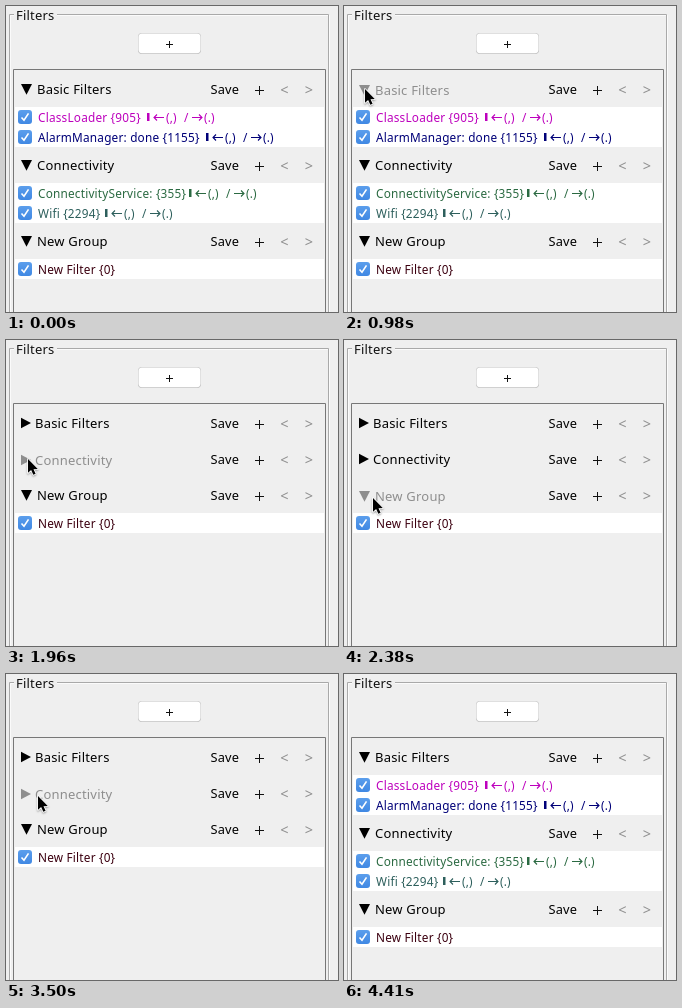
These frames come from a looping animation (332 by 306 pixels, 4.83 s). An HTML page with a canvas:

```html
<!DOCTYPE html>
<html lang="en">
<head>
<meta charset="utf-8">
<title>Filter groups</title>
<style>
  html, body { margin: 0; width: 100%; height: 100%; overflow: hidden; background: #efefef; }
  canvas { display: block; }
</style>
</head>
<body>
<canvas id="stage" width="332" height="306"></canvas>
<script>
const ctx = document.getElementById('stage').getContext('2d');
const LOOP = 4830, STEP = 70;
const FAMILY = '"Noto Sans", "Open Sans", sans-serif';
const GRAY = '#8e8e8e';

// "closed" is the time span in which a group is folded.
const groups = [
  { name: 'Basic Filters', closed: [1190, 4200], rows: [
    { text: 'ClassLoader {905}', color: '#bd00bd', tail: 142 },
    { text: 'AlarmManager: done {1155}', color: '#000078', tail: 201 }] },
  { name: 'Connectivity', closed: [1890, 3570], rows: [
    { text: 'ConnectivityService: {355}', color: '#2b6a42', tail: 184 },
    { text: 'Wifi {2294}', color: '#2d5f5c', tail: 100 }] },
  { name: 'New Group', closed: [2660, 3150], rows: [
    { text: 'New Filter {0}', color: '#3c0010' }] }
];

// Pointer path: time, x, y
const path = [
  [630, -6, 112], [910, 19, 87], [980, 21, 83], [1330, 21, 83],
  [1540, 24, 135], [1700, 22, 119], [1960, 22, 119], [2240, 29, 158],
  [3150, 29, 158], [3430, 32, 122], [3570, 32, 122], [3800, 35, 87],
  [4200, 35, 87], [4340, 41, 278]
];

function pointerAt(t) {
  const i = path.findIndex(p => p[0] >= t);
  if (i < 1) return null;
  const [t0, x0, y0] = path[i - 1], [t1, x1, y1] = path[i];
  const u = (t - t0) / (t1 - t0), e = u * u * (3 - 2 * u);
  return { x: Math.round(x0 + (x1 - x0) * e), y: Math.round(y0 + (y1 - y0) * e) };
}

function rect(x, y, w, h, color) {
  ctx.fillStyle = color;
  ctx.fillRect(x, y, w, h);
}

function label(str, x, y, size, color, align = 'left') {
  ctx.font = `${size}px ${FAMILY}`;
  ctx.letterSpacing = '0.2px';
  ctx.textAlign = align;
  ctx.fillStyle = color;
  ctx.fillText(str, x, y);
}

function trace(points, closed) {
  ctx.beginPath();
  points.forEach(([x, y]) => ctx.lineTo(x, y));
  if (closed) ctx.closePath();
}

function stroke(color, width) {
  ctx.strokeStyle = color;
  ctx.lineWidth = width;
  ctx.stroke();
}

function box(x, y, w, h, r, fill) {
  ctx.beginPath();
  ctx.roundRect(x, y, w, h, r);
  ctx.fillStyle = fill;
  ctx.fill();
}

function outline(x, y, w, h, color) {
  ctx.beginPath();
  ctx.rect(x + 0.5, y + 0.5, w - 1, h - 1);
  stroke(color, 1);
}

function plus(x, y, r) {
  rect(x - r, y, 2 * r + 1, 1, '#111');
  rect(x, y - r, 1, 2 * r + 1, '#111');
}

function frame() {
  rect(0, 0, 332, 306, '#efefef');
  outline(4, 9, 320, 320, '#fbfbfb');
  outline(3, 8, 320, 320, '#a9a9a9');
  rect(8, 7, 43, 6, '#efefef');
  label('Filters', 10, 14, 13, '#111');

  box(132, 27, 63, 21, 4, '#c0c0c0');
  box(132.5, 27.5, 62, 19.7, 3.6, '#fff');
  plus(163, 38, 3);

  outline(7, 63, 313, 300, '#777');
}

function checkbox(y) {
  const g = ctx.createLinearGradient(0, y - 7, 0, y + 7);
  g.addColorStop(0, '#5b9eec');
  g.addColorStop(1, '#4088e3');
  box(12, y - 7, 14, 14, 3, g);
  trace([[15.5, y + 0.5], [18, y + 3.3], [22.5, y - 3.6]]);
  stroke('#fff', 1.6);
}

function arrow(x, y, dir, color) {
  const tip = dir < 0 ? x : x + 10, back = tip - dir * 3;
  rect(x, y, 10, 1, color);
  trace([[back, y - 2.5], [tip, y + 0.5], [back, y + 3.5]]);
  stroke(color, 1.1);
}

function filterRow({ text, color, tail }, y) {
  const write = (str, x) => label(str, x, y + 5, 11.8, color);
  rect(9, y - 10, 309, 20, '#fff');
  checkbox(y);
  write(text, 32);
  if (!tail) return;
  rect(tail - 1, y - 4, 2.5, 8, color);
  arrow(tail + 6, y, -1, color);
  write('(,)', tail + 18);
  write('/', tail + 36);
  arrow(tail + 44, y, 1, color);
  write('(.)', tail + 56);
}

function header(name, y, open, hover) {
  const color = hover ? GRAY : '#000', ly = hover ? y + 1 : y;
  trace(open
    ? [[15, ly - 5], [26, ly - 5], [20.5, ly + 5.7]]
    : [[15, ly - 5.3], [25, ly], [15, ly + 5.3]], true);
  ctx.fillStyle = color;
  ctx.fill();
  label(name, open ? 31 : 29, ly + 5, 13, color);
  label('Save', 204.5, y + 5, 12.8, '#000');
  plus(253, y + 1, 4);
  label('<', 278.5, y + 6, 14.5, GRAY, 'center');
  label('>', 303, y + 6, 14.5, GRAY, 'center');
}

function pointer({ x, y }) {
  ctx.save();
  ctx.translate(x, y);
  ctx.scale(0.95, 0.95);
  ctx.lineJoin = 'round';
  trace([[0, 0], [0, 14.5], [3.3, 11.5], [5.6, 16.6], [8, 15.5], [5.8, 10.7], [10.3, 10.5]], true);
  ctx.shadowColor = 'rgba(0, 0, 0, 0.35)';
  ctx.shadowBlur = 2;
  ctx.shadowOffsetY = 1;
  stroke('#fff', 1.8);
  ctx.shadowColor = 'transparent';
  ctx.fillStyle = '#000';
  ctx.fill();
  ctx.restore();
}

function draw(t) {
  const p = pointerAt(t);
  frame();
  let y = 65;
  for (const { name, rows, closed } of groups) {
    const open = t < closed[0] || t >= closed[1];
    const mid = y + 18;
    header(name, mid, open, p && p.x > 10 && Math.abs(p.y - mid) < 13);
    y += 36;
    if (!open) continue;
    for (const row of rows) {
      filterRow(row, y + 10);
      y += 20;
    }
  }
  if (p) pointer(p);
}

const start = performance.now();
function tick() {
  const t = (performance.now() - start) % LOOP;
  draw(Math.floor(t / STEP) * STEP);
  requestAnimationFrame(tick);
}
tick();
</script>
</body>
</html>
```
